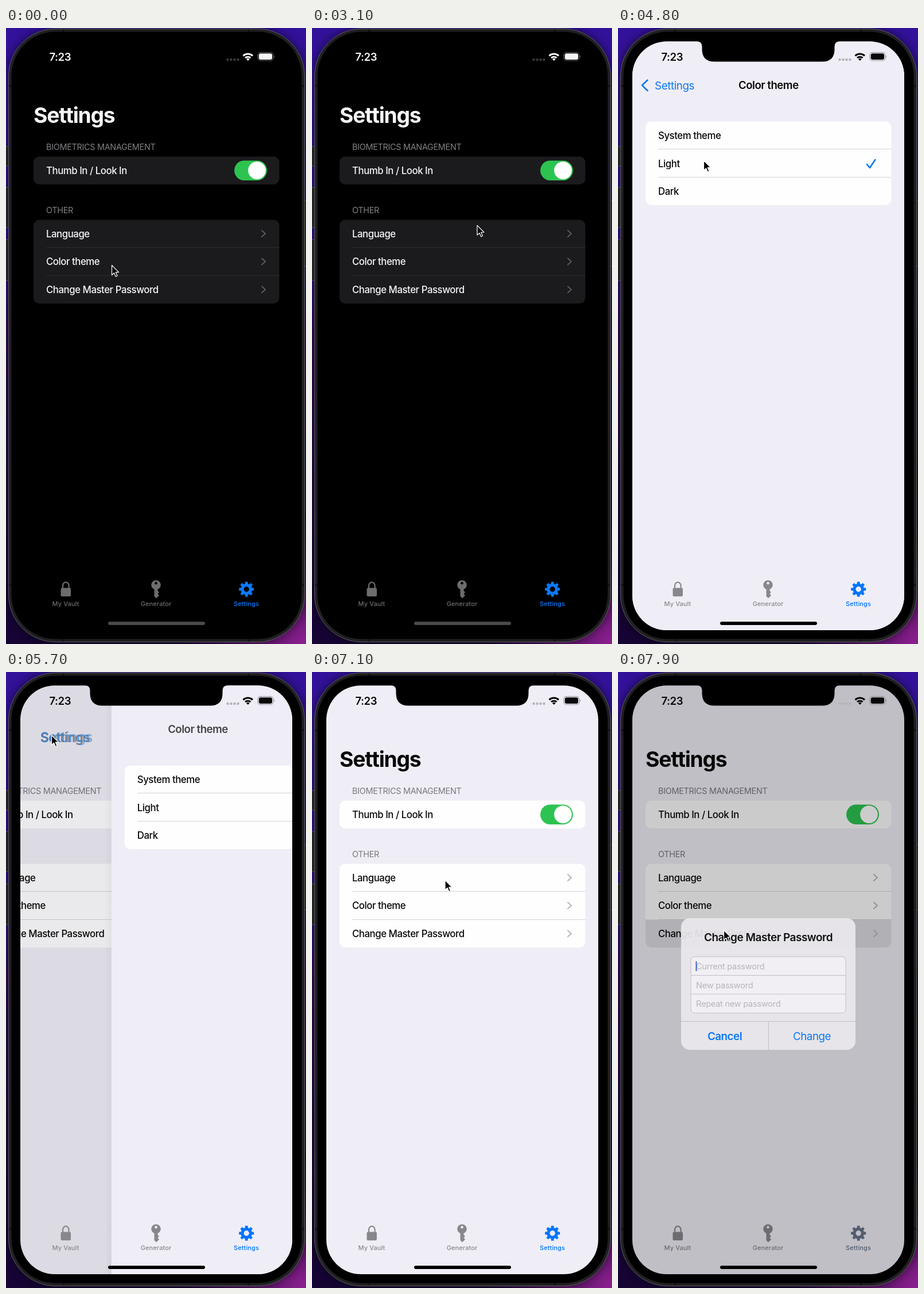
Recreate the animation shown at these times as an HTML page. Size 523 by 1071 pixels, loop 8000 ms.

```html
<!DOCTYPE html>
<html lang="en">
<head>
<meta charset="utf-8">
<title>Settings</title>
<style>
html, body { margin: 0; width: 100%; height: 100%; overflow: hidden; background: #000; }
svg {
  display: block; width: 100vw; height: 100vh;
  font-family: Inter, Roboto, sans-serif; letter-spacing: -.03em;
  --bg: #000; --card: #1b1a1d; --press: #28272a; --text: #f6f6f6; --head: #828286;
  --line: #2c2b2f; --arrow: #59595d; --tab: #6d6d70; --tint: #0a7aff;
  --dots: #3a3a3c; --bar: #4b4b4c; --rim: #68686a;
}
svg.light {
  --bg: #efeef6; --card: #fefdff; --press: #dddce2; --text: #080808; --head: #79787e;
  --line: #d3d2d7; --arrow: #b7b6bc; --tab: #88888c; --tint: #0074fb;
  --dots: #b3b2b8; --bar: #000; --rim: #8d8c92;
}
svg.alerting { --tint: #66748a; }
.bg { fill: var(--bg); }
.card { fill: var(--card); }
.press { fill: var(--press); }
.ink { fill: var(--text); }
.row { font-size: 16.8px; font-weight: 500; letter-spacing: -.027em; fill: var(--text); }
.head { font-size: 14.4px; letter-spacing: -.02em; fill: var(--head); }
.line { stroke: var(--line); }
.arrow, .tint-line { fill: none; stroke: var(--arrow); stroke-width: 2; stroke-linecap: round; stroke-linejoin: round; }
.tint-line { stroke: #0074e8; stroke-width: 2.5; }
.tab { fill: var(--tab); }
.tab text, .active text { font-size: 11px; font-weight: 500; letter-spacing: .1px; text-anchor: middle; }
.active { fill: var(--tint); }
.large { font-size: 37.3px; font-weight: 700; letter-spacing: -.033em; fill: var(--text); }
.back { font-size: 18.8px; letter-spacing: -.022em; fill: #0b76ee; }
.title { font-size: 18.6px; font-weight: 600; text-anchor: middle; fill: var(--text); }
.field { font-size: 14.5px; letter-spacing: -.015em; fill: #b5b4b9; }
.action { font-size: 18.8px; text-anchor: middle; fill: #0b78f3; }
.shadow { filter: blur(9px); opacity: .55; }
</style>
</head>
<body>
<svg id="stage" viewBox="0 0 523 1071" preserveAspectRatio="none">
  <defs>
    <linearGradient id="wall" x2="0" y2="1">
      <stop offset="0" stop-color="#33129b"/><stop offset=".38" stop-color="#341086"/>
      <stop offset=".5" stop-color="#330a54"/><stop offset="1" stop-color="#150434"/>
    </linearGradient>
    <radialGradient id="glow" gradientUnits="userSpaceOnUse" cx="523" cy="1071" r="220">
      <stop offset="0" stop-color="#8c2090"/><stop offset="1" stop-color="#8c2090" stop-opacity="0"/>
    </radialGradient>
    <linearGradient id="edge"><stop offset="0" stop-opacity="0"/><stop offset="1" stop-opacity=".04"/></linearGradient>
    <clipPath id="screen"><rect x="25" y="23.5" width="474" height="1023.5" rx="60"/></clipPath>
    <clipPath id="options"><rect x="48" y="333.5" width="428.5" height="145.5" rx="10"/></clipPath>
  </defs>

  <rect width="523" height="1071" fill="url(#wall)"/>
  <rect width="523" height="1071" fill="url(#glow)"/>
  <rect class="shadow" x="4" y="1" width="517" height="1067" rx="82"/>
  <g fill="#222224" stroke="#4d4d50">
    <rect x="-4" y="206" width="9" height="34"/><rect x="-4" y="277" width="9" height="70"/>
    <rect x="-4" y="368" width="9" height="71"/><rect x="519" y="300" width="9" height="114"/>
    <rect x="4.5" y="1.5" width="516" height="1066" rx="82" fill="#202022" stroke="#5c5c5f"/>
  </g>
  <path d="M5 101h5M5 968h5M515 101h5M515 968h5M100 2v5M423 2v5M100 1062v5M423 1062v5" stroke="#151516" stroke-width="4"/>
  <rect x="9.5" y="6.5" width="506" height="1056" rx="77"/>

  <g clip-path="url(#screen)">
    <rect class="bg" x="25" y="23" width="474" height="1025"/>
    <g id="list">
      <text class="head" x="70" y="212">BIOMETRICS MANAGEMENT</text>
      <rect class="card" x="48" y="223.5" width="428.5" height="48.5" rx="10"/>
      <text class="row" x="70" y="253.5">Thumb In / Look In</text>
      <rect x="398" y="230.5" width="57" height="34.5" rx="17.25" fill="#2dc350"/>
      <circle cx="437.5" cy="247.7" r="15.4" fill="#fff"/>
      <text class="head" x="70" y="322">OTHER</text>
      <g clip-path="url(#options)">
        <rect class="card" x="48" y="333" width="429" height="147"/>
        <rect class="press" id="pressed" x="48" width="429" height="48.5"/>
      </g>
      <path class="line" d="M70 381.5H476.5M70 430.5H476.5"/>
      <g id="optionRows"></g>
    </g>
    <rect id="dim" x="25" y="23" width="474" height="1025"/>
    <g id="detail">
      <rect id="shade" x="13" y="23" width="12.5" height="1025" fill="url(#edge)"/>
      <rect class="bg" x="25" y="23" width="475" height="1025"/>
      <rect class="card" x="48" y="162.5" width="428.5" height="145.5" rx="10"/>
      <path class="line" d="M70 210.5H476.5M70 259.5H476.5"/>
      <g id="themeRows"></g>
      <path id="check" class="tint-line" d="M434 237l5 6L448.5 229"/>
    </g>
    <text id="large" class="large">Settings</text>
    <text id="back" class="back">Settings</text>
    <path id="backArrow" class="tint-line" d="M51.5 90.5L42 99.7L51.5 109"/>
    <text id="title" class="title" y="106">Color theme</text>
    <g class="tab">
      <rect x="95.5" y="973.5" width="17.5" height="14.8" rx="2.2"/>
      <path d="M99 974v-4.5a5.3 5.8 0 0 1 10.6 0V974" fill="none" stroke="var(--tab)" stroke-width="2.2"/>
      <text x="104" y="1005">My Vault</text>
      <path fill-rule="evenodd" d="M258.5 976A8.2 8.2 0 1 1 264.5 976V978.5L267 981L264.5 983.5L267 986.5L262 991.5L258.5 988ZM261.5 963a2.3 2.3 0 1 0 .01 0Z"/>
      <text x="261.5" y="1005">Generator</text>
    </g>
    <g class="active">
      <path id="gear" fill-rule="evenodd" transform="translate(419.2 975.8)"/>
      <text x="419" y="1005">Settings</text>
    </g>
    <rect id="alertDim" x="25" y="23" width="474" height="1025"/>
  </g>

  <path d="M138 23Q146.5 24 146.5 32V37Q146.5 58.5 168 58.5H356Q377.5 58.5 377.5 37V32Q377.5 24 386 23Z"/>
  <g class="ink">
    <text x="75.5" y="56.5" font-size="18.6" font-weight="600">7:23</text>
    <g fill="none" stroke="var(--text)" stroke-width="3">
      <path d="M413.5 48.3a12 12 0 0 1 16.5 0M417 52a7 7 0 0 1 9.5 0"/>
    </g>
    <path d="M418.8 54a4.5 4.5 0 0 1 6 0L421.8 57Z"/>
    <rect x="439" y="42.5" width="26.8" height="14.3" rx="4.5" fill="none" stroke="var(--rim)" stroke-width="1.1"/>
    <rect x="440.8" y="44.2" width="23.2" height="10.9" rx="3"/>
    <path d="M467.2 47.3q2.2 2.3 0 4.8Z" fill="var(--rim)"/>
  </g>
  <path d="M386.5 55h18.5" stroke="var(--dots)" stroke-width="4.4" stroke-linecap="round" stroke-dasharray="0 6"/>
  <rect x="178" y="1032.3" width="169" height="5.6" rx="2.8" fill="var(--bar)"/>

  <g id="alert">
    <rect x="110" y="428" width="304" height="229" rx="15" fill="#ebe9ed" fill-opacity=".93"/>
    <text x="262" y="467.5" font-size="19" font-weight="600" text-anchor="middle" letter-spacing="-.5" fill="#111">Change Master Password</text>
    <g stroke="#c2c0c5">
      <rect x="127" y="495" width="270" height="98" rx="6.5" fill="#f1eff3"/>
      <path d="M127 527.5H397M127 560H397M110 607.5H414M262.5 607.5V657"/>
    </g>
    <text class="field" x="136" y="517">Current password</text>
    <text class="field" x="136" y="549.5">New password</text>
    <text class="field" x="136" y="582">Repeat new password</text>
    <rect x="135.5" y="503" width="2" height="17" fill="#3867e0"/>
    <text class="action" x="186" y="639.5" font-weight="600">Cancel</text>
    <text class="action" x="338" y="639.5">Change</text>
  </g>
  <path id="cursor" d="M0 0V17L4 13.3L6.8 19.7L9.5 18.5L6.8 12.2H12Z" fill="#050505" stroke="#fff" stroke-width="1.2" stroke-linejoin="round"/>
</svg>
<script>
const LOOP = 8000, STEP = 100, WIDTH = 473, ROW = 48.6;
const PUSH = 3820.5, POP = 5633.6, LIGHT = 4800, ALERT = 7700;
const el = Object.fromEntries([...document.querySelectorAll('[id]')].map(n => [n.id, n]));
const set = (node, attrs) => { for (const k in attrs) node.setAttribute(k, attrs[k]); };
const lerp = (a, b, k) => a + (b - a) * k;
const clamp = v => Math.max(0, Math.min(1, v));

const rows = (labels, y, arrow) => labels.map((label, i) => {
  const cy = y + i * ROW;
  return `<text class="row" x="70" y="${cy + 6}">${label}</text>` +
    (arrow ? `<path class="arrow" d="M446 ${cy - 5.5}l6 5.5l-6 5.5"/>` : '');
}).join('');
el.optionRows.innerHTML = rows(['Language', 'Color theme', 'Change Master Password'], 357.5, true);
el.themeRows.innerHTML = rows(['System theme', 'Light', 'Dark'], 187, false);

function gearPath() {
  const points = [];
  for (let i = 0; i < 8; i++) {
    for (const [da, r] of [[-.27, 9.8], [-.17, 13.2], [.17, 13.2], [.27, 9.8]]) {
      const a = i * Math.PI / 4 + da;
      points.push((r * Math.cos(a)).toFixed(2) + ' ' + (r * Math.sin(a)).toFixed(2));
    }
  }
  return `M${points.join('L')}ZM4.7 0A4.7 4.7 0 1 0 -4.7 0A4.7 4.7 0 1 0 4.7 0Z`;
}
set(el.gear, { d: gearPath() });

// time, x, y
const pointer = [
  [0, 184.5, 412.5], [1700, 374.5, 305], [2200, 378, 290], [2600, 352, 310], [2800, 352, 310],
  [3600, 149.5, 414.5], [4100, 149.5, 414.5], [4600, 149.5, 230.5], [4900, 149.5, 230.5],
  [5500, 79.5, 110], [5900, 79.5, 110], [7100, 232, 362], [7500, 184.5, 449], [LOOP, 184.5, 449]
];
function pointerAt(t) {
  const i = pointer.findIndex(p => p[0] > t);
  const [a, b] = [pointer[i - 1], pointer[i]];
  const k = (t - a[0]) / (b[0] - a[0]), e = k * k * (3 - 2 * k);
  return [lerp(a[1], b[1], e), lerp(a[2], b[2], e)];
}

// Critically damped spring from 1 to 0.
function spring(t) {
  if (t <= 0) return 1;
  const v = (1 + .018 * t) * Math.exp(-.018 * t);
  return v < .001 ? 0 : v;
}

function draw(t) {
  const light = t >= LIGHT;
  const alertShow = clamp((t - ALERT) / 200);
  el.stage.setAttribute('class', (light ? 'light' : '') + (alertShow ? ' alerting' : ''));

  // 1 shows the list, 0 shows the detail page.
  const away = spring(t - PUSH) + 1 - spring(t - POP);
  const nav = Math.pow(away, t < LIGHT ? .91 : 1.235);
  set(el.list, { transform: `translate(${-.3 * WIDTH * (1 - away)})` });
  set(el.dim, { opacity: .12 * (1 - away) });
  set(el.detail, { transform: `translate(${WIDTH * away})`, visibility: away < 1 ? 'visible' : 'hidden' });
  set(el.shade, { opacity: away > 0 ? 1 : 0 });

  const x = lerp(64, 48, nav), y = lerp(106.5, 164.5, nav);
  const big = clamp((nav - .18) * 5), moving = nav > 0 && nav < 1;
  set(el.large, { transform: `translate(${x} ${y}) scale(${lerp(69 / 146, 1, nav)})`, opacity: big });
  set(el.back, {
    transform: `translate(${x} ${y}) scale(${lerp(1, 146 / 69, nav)})`,
    opacity: (1 - big) * (moving ? .88 : 1),
    'font-weight': moving ? 500 : 400
  });
  set(el.backArrow, { opacity: clamp(1 - nav * 6) });
  set(el.title, { x: 262.3 + 278 * nav, opacity: 1 - nav });
  set(el.check, { transform: `translate(0 ${light ? 0 : -ROW})` });

  const themePressed = t >= 3700 && t < LIGHT, passwordPressed = t >= ALERT;
  set(el.pressed, {
    y: passwordPressed ? 430.5 : 382,
    visibility: themePressed || passwordPressed ? 'visible' : 'hidden'
  });

  set(el.alertDim, { opacity: .2 * alertShow });
  set(el.alert, {
    opacity: alertShow,
    transform: `translate(262 542.5) scale(${lerp(1.18, 1, alertShow)}) translate(-262 -542.5)`
  });
  set(el.cursor, { transform: `translate(${pointerAt(t).join(' ')})` });
}

const start = performance.now();
function tick() {
  const t = (performance.now() - start) % LOOP;
  draw(Math.floor((t + 4) / STEP) * STEP % LOOP);
  requestAnimationFrame(tick);
}
draw(0);
requestAnimationFrame(tick);
</script>
</body>
</html>
```
